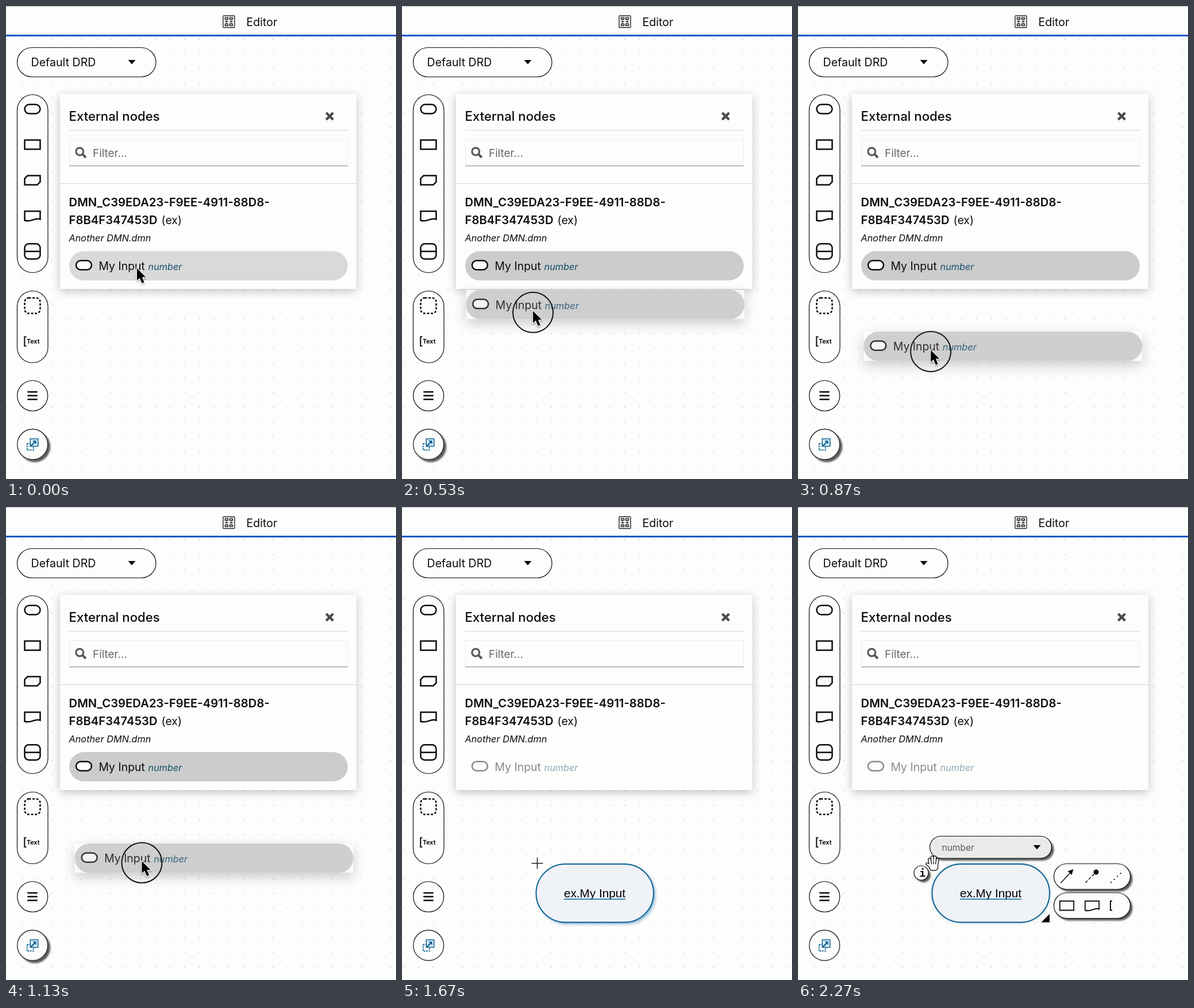
These frames come from a looping animation (679x824 px, 2540 ms). An HTML page with a canvas:

```html
<!DOCTYPE html>
<html lang="en">
<head>
<meta charset="utf-8">
<title>Drag an external node into a diagram</title>
<style>
  html, body { margin: 0; width: 100%; height: 100%; overflow: hidden; background: #fdfdfc; }
  canvas { display: block; width: 679px; height: 824px; }
</style>
</head>
<body>
<canvas id="stage" width="679" height="824"></canvas>
<script>
const ctx = document.getElementById('stage').getContext('2d');
const LOOP = 2540, STEP = 200 / 3;
const PRESS = 330, DRAG = 465, SETTLE = 1133, RELEASE = 1330, DROP = 1460, NODE = 1660, HOVER = 1730;
const INK = '#0c0c0c', BLUE = '#0b6294', PAPER = '#fdfdfc', RULE = '#d3d3e0', GREY = '#5a5a5a';
const OUTLINE = { fill: PAPER, stroke: INK };

const ramp = (t, from, to) => Math.max(0, Math.min(1, (t - from) / (to - from)));

function paint({ fill, stroke, width = 1.2, dash = [] }) {
  if (fill) { ctx.fillStyle = fill; ctx.fill(); }
  if (stroke) {
    ctx.strokeStyle = stroke;
    ctx.lineWidth = width;
    ctx.setLineDash(dash);
    ctx.stroke();
    ctx.setLineDash([]);
  }
}

function box(x, y, w, h, r, style) {
  ctx.beginPath();
  ctx.roundRect(x, y, w, h, r);
  paint(style);
}

// A box given by its centre.
const centred = (x, y, w, h, r, style) => box(x - w / 2, y - h / 2, w, h, r, style);

function circle(x, y, r, style) {
  ctx.beginPath();
  ctx.arc(x, y, r, 0, Math.PI * 2);
  paint(style);
}

function poly(points, style, closed = true) {
  ctx.beginPath();
  points.forEach(([x, y]) => ctx.lineTo(x, y));
  if (closed) ctx.closePath();
  paint(style);
}

const line = (x0, y0, x1, y1, stroke, width = 1, dash) =>
  poly([[x0, y0], [x1, y1]], { stroke, width, dash }, false);

function text(s, x, y, size, { color = INK, style = '', family = 'Inter, sans-serif' } = {}) {
  ctx.font = `${style} ${size}px ${family}`;
  ctx.fillStyle = color;
  ctx.fillText(s, x, y);
}

function at(x, y, draw, alpha = 1) {
  ctx.save();
  ctx.translate(x, y);
  ctx.globalAlpha *= alpha;
  draw();
  ctx.restore();
}

function shadowed(color, offset, blur, draw) {
  const [shadowOffsetX, shadowOffsetY] = offset;
  ctx.save();
  Object.assign(ctx, { shadowColor: color, shadowOffsetX, shadowOffsetY, shadowBlur: blur });
  draw();
  ctx.restore();
}

function raised(x, y, w, h, fill) {
  shadowed(GREY, [4, 4], 3, () => box(x, y, w, h, h / 2, { fill }));
  box(x, y, w, h, h / 2, { fill, stroke: INK });
}

// Symbols drawn around the current origin.
const caret = () => poly([[-6.5, -4], [6.5, -4], [0, 3.5]], { fill: INK });

const symbol = {
  input: style => centred(0, 0, 27, 16, 8, style),
  decision: style => centred(0, 0, 27, 16, 0, style),
  knowledge(style) {
    const w = 13.5, h = 8, cut = 5;
    poly([[cut - w, -h], [w, -h], [w, h - cut], [w - cut, h], [-w, h], [-w, cut - h]], style);
  },
  source(style) {
    const w = 13.5, h = 8;
    ctx.beginPath();
    ctx.moveTo(-w, h);
    ctx.lineTo(-w, -h);
    ctx.lineTo(w, -h);
    ctx.lineTo(w, h - 2);
    ctx.bezierCurveTo(w * .3, h - 6, -w * .1, h + 4, -w, h);
    ctx.closePath();
    paint(style);
  },
  service(style) {
    centred(0, 0, 27, 26.5, 7, style);
    line(-13.5, 0, 13.5, 0, style.stroke, style.width);
  },
  bracket: style => poly([[3, -8], [0, -8], [0, 8], [3, 8]], style, false),
};

function background() {
  const gap = 25.65;
  ctx.fillStyle = PAPER;
  ctx.fillRect(0, 0, 679, 824);
  ctx.fillStyle = '#c3c3ce';
  for (let y = 622 % gap; y < 824; y += gap)
    for (let x = 234 % gap; x < 679; x += gap) ctx.fillRect(x - .75, y - .75, 1.5, 1.5);
}

function editorIcon() {
  const edge = { stroke: '#222', width: 1.4 };
  centred(0, 0, 20, 20.5, 1, edge);
  for (const x of [-4, 4]) {
    for (const y of [-5.5, 5.5]) centred(x, y, 5, 3, 0, edge);
    line(x - 3, 0, x + 3, 0, '#222', 1.3);
    line(x, -4, x, 4, '#222');
  }
}

function header() {
  ctx.fillStyle = PAPER;
  ctx.fillRect(0, 0, 679, 50);
  line(0, .5, 679, .5, '#c6c6c6', 1.5);
  ctx.fillStyle = '#0a57c8';
  ctx.fillRect(0, 50, 679, 3);
  at(388, 27.2, editorIcon);
  text('Editor', 418.5, 35, 19.6);
  box(19.5, 72.5, 241.5, 51, 25.5, OUTLINE);
  text('Default DRD', 43.5, 104.5, 19.6);
  at(219, 98, caret);
}

function externalIcon() {
  centred(-4, 4.5, 11, 11, 0, { stroke: BLUE, width: 1.8, dash: [2.6, 1.6] });
  centred(2.8, -3, 13.5, 13, 0, { fill: '#dcebf5', stroke: BLUE, width: 1.5 });
  line(-3.5, 3.5, 4, -4, BLUE, 2.4);
  poly([[0, -6.5], [6.5, -6.5], [6.5, 0]], { fill: BLUE });
}

function sidebar(active) {
  const bold = { stroke: INK, width: 2.5 };
  box(19.5, 154.5, 53.5, 310, 26.75, OUTLINE);
  ['input', 'decision', 'knowledge', 'source', 'service'].forEach((name, i) =>
    at(46, 179.5 + 62 * i, () => symbol[name](bold)));

  box(19.5, 496.5, 53.5, 125, 26.75, OUTLINE);
  centred(46, 522, 27, 27, 7, { ...bold, dash: [4, 2.6] });
  at(32.3, 584.3, () => symbol.bracket({ stroke: INK, width: 2 }));
  text('Text', 36, 588, 10.6, { style: 'bold' });

  circle(46.2, 679, 26.5, OUTLINE);
  for (const d of [-6.5, 0, 6.5]) line(37.3, 678.8 + d, 54.7, 678.8 + d, INK, 2.5);

  if (active) shadowed(GREY, [4, 4], 3, () => circle(46.2, 763.7, 27, { fill: PAPER }));
  circle(46.2, 763.7, 26.5, OUTLINE);
  at(46.2, 763.5, externalIcon);
}

function item(fill, alpha = 1) {
  if (fill) box(110, 427, 485, 51, 25.5, { fill });
  ctx.save();
  ctx.globalAlpha *= alpha;
  at(135.5, 451.5, () => symbol.input({ fill: PAPER, stroke: INK, width: 2.5 }));
  text('My Input', 161.5, 460, 19.4);
  text('number', 247.5, 460, 16.3, { style: 'italic', color: '#164f6b' });
  ctx.restore();
}

function panel(t) {
  shadowed('rgba(0,0,0,.24)', [0, 4], 15, () => box(94, 153, 516, 340, 0, { fill: PAPER }));
  text('External nodes', 109.5, 200, 22.2, { style: '500' });
  for (const d of [-6, 6]) line(563.5 - d, 186, 563.5 + d, 198, '#4b4b4b', 4.2);
  line(110, 216.5, 595, 216.5, RULE);

  box(110.5, 232.5, 484, 46, 0, { stroke: '#ececea', width: 1 });
  line(110, 278.5, 595, 278.5, '#858585', 1.2);
  circle(128.3, 253.5, 6.4, { stroke: GREY, width: 3.2 });
  line(133, 258, 139, 264, GREY, 4);
  text('Filter...', 151, 263, 18.9, { color: '#66666a' });
  line(94, 309.5, 610, 309.5, RULE);

  text('DMN_C39EDA23-F9EE-4911-88D8-', 109.5, 348.5, 20.3, { style: '600' });
  text('F8B4F347453D', 109.5, 380, 20.3, { style: '600' });
  text('(ex)', 270.5, 380, 19.5);
  text('Another DMN.dmn', 109.5, 410, 16.3, { style: 'italic' });
  if (t >= NODE) item(null, .48);
  else item(t < PRESS ? '#d9d9d9' : '#cccccc');
}

// The drag starts softly, then slows down exponentially towards the drop point.
function travel(t) {
  const pull = ramp(t, 385, 500) * 171 * (1 - Math.exp(-(t - 377) / 275));
  return { x: 8.5 * ramp(t, DRAG, SETTLE) ** 2, y: Math.min(164, pull) };
}

function ghost(t) {
  if (t < DRAG || t >= DROP) return;
  const lag = 18;
  at(travel(t).x + 1.2, travel(t - lag).y, () => {
    shadowed('rgba(0,0,0,.24)', [0, 8], 22, () => box(110, 427, 485, 51, 0, { fill: '#fff' }));
    item('#c6c6c6');
  }, .82);
}

function node(t) {
  if (t < NODE) return;
  const hover = ramp(t, HOVER, 2000), offset = 3 * (1 - hover);
  const place = [233.5, 622, 204.5, 101.5, 50.75];
  shadowed('rgba(11,98,160,.5)', [offset, offset], 5, () => box(...place, { fill: '#eff2f7' }));
  box(...place, { stroke: BLUE, width: 2 });
  text('ex.My Input', 282, 680, 20.7, { color: '#000', family: '"Liberation Sans", Arial, sans-serif' });
  line(282, 683.3, 389, 683.3, BLUE, 1.5);
  at(0, 0, nodeActions, hover);
}

function nodeActions() {
  const thin = { stroke: INK, width: 2 };
  raised(229.5, 573.5, 212, 38.5, '#eaeaea');
  text('number', 250.5, 598.5, 15.5, { color: GREY });
  at(416, 593, caret);

  raised(202, 625, 25, 25, PAPER);
  text('i', 211.2, 643.5, 18, { style: 'bold', family: '"DejaVu Sans Mono", monospace' });
  poly([[438, 709], [438, 723.5], [423.5, 723.5]], { fill: '#000' });

  raised(445.5, 621.5, 133, 44.5, PAPER);
  line(457.5, 655, 475, 636, INK, 1.5);
  poly([[479.5, 631], [476.5, 641], [469.5, 634.5]], { fill: INK });
  line(500.5, 654.5, 519, 636, INK, 1.5, [5, 3]);
  circle(519, 636, 4.5, { fill: INK });
  line(544.5, 654.5, 566, 634, INK, 2, [2, 5.5]);

  raised(445.5, 672, 133, 44.5, PAPER);
  ['decision', 'source', 'bracket'].forEach((name, i) =>
    at(468 + 44 * i - (i > 1 ? 12 : 0), 694.5, () => {
      if (i < 2) ctx.scale(.9, 1);
      symbol[name](thin);
    }));
}

function arrowCursor() {
  const shape = [[0, 0], [0, 21], [4.8, 16.8], [8.8, 26], [12.6, 24.3], [8.8, 15.3], [15.3, 15.3]];
  ctx.lineJoin = 'round';
  shadowed('rgba(0,0,0,.3)', [0, 2], 3, () => poly(shape, { stroke: '#fff', width: 2.4 }));
  poly(shape, { fill: '#000' });
}

// Each finger is a thick dark stroke with a white core.
function handCursor(open) {
  const spread = open ? 4.7 : 3.8, reach = open ? 11.5 : 6, palm = open ? 9 : 7;
  ctx.lineCap = ctx.lineJoin = 'round';
  for (const [color, width] of [['#111', 5.8], ['#fff', 3.2]]) {
    for (let u = -1.5; u <= 1.5; u++) line(spread * u, .9 * u * u * u * u - reach + (u * u < 1 ? .5 : 0), 3.5 * u, 3, color, width);
    line(-reach / 2 - 5, 1, -4, palm - 3, color, width);
    centred(0, palm / 2 + 1, 11, palm, 4, { fill: color, stroke: color, width });
  }
  for (let u = -1; u <= 1; u++) line(3.6 * u, -2, 3.6 * u, open ? 1 : 4.5, '#111', 1.2);
}

function crossCursor() {
  for (const [color, width] of [['rgba(255,255,255,.8)', 3.2], ['#222', 1.5]]) {
    line(-10, 0, 10, 0, color, width);
    line(0, -10, 0, 10, color, width);
  }
}

function clickRing(t) {
  const shrink = 27 * (1 - ramp(t, PRESS, 533)) ** 1.5;
  const release = ramp(t, RELEASE, DROP);
  const alpha = ramp(t, PRESS - STEP, 400) * (1 - release);
  at(0, 2.7, () => circle(0, 0, 35 + shrink + 13 * release, { stroke: '#111', width: 2 }), alpha);
}

function pointer(t) {
  const move = travel(t), x = 228 + move.x, y = 457 + move.y;
  if (t >= PRESS && t < DROP) at(x, y, () => clickRing(t));
  if (t >= HOVER) at(236, 621, () => handCursor(true));
  else if (t >= NODE) at(235.5, 620.7, crossCursor);
  else if (t >= PRESS && t < DRAG) at(x + 1, y + 6, () => handCursor(false));
  else at(x, y, arrowCursor);
}

function render(elapsed) {
  const t = Math.floor((elapsed % LOOP + 5) / STEP) * STEP;
  background();
  header();
  sidebar(t < NODE);
  panel(t);
  node(t);
  ghost(t);
  pointer(t);
}

let start;
function tick(now) {
  start ??= now;
  render(now - start);
  requestAnimationFrame(tick);
}
render(0);
requestAnimationFrame(tick);
</script>
</body>
</html>
```
